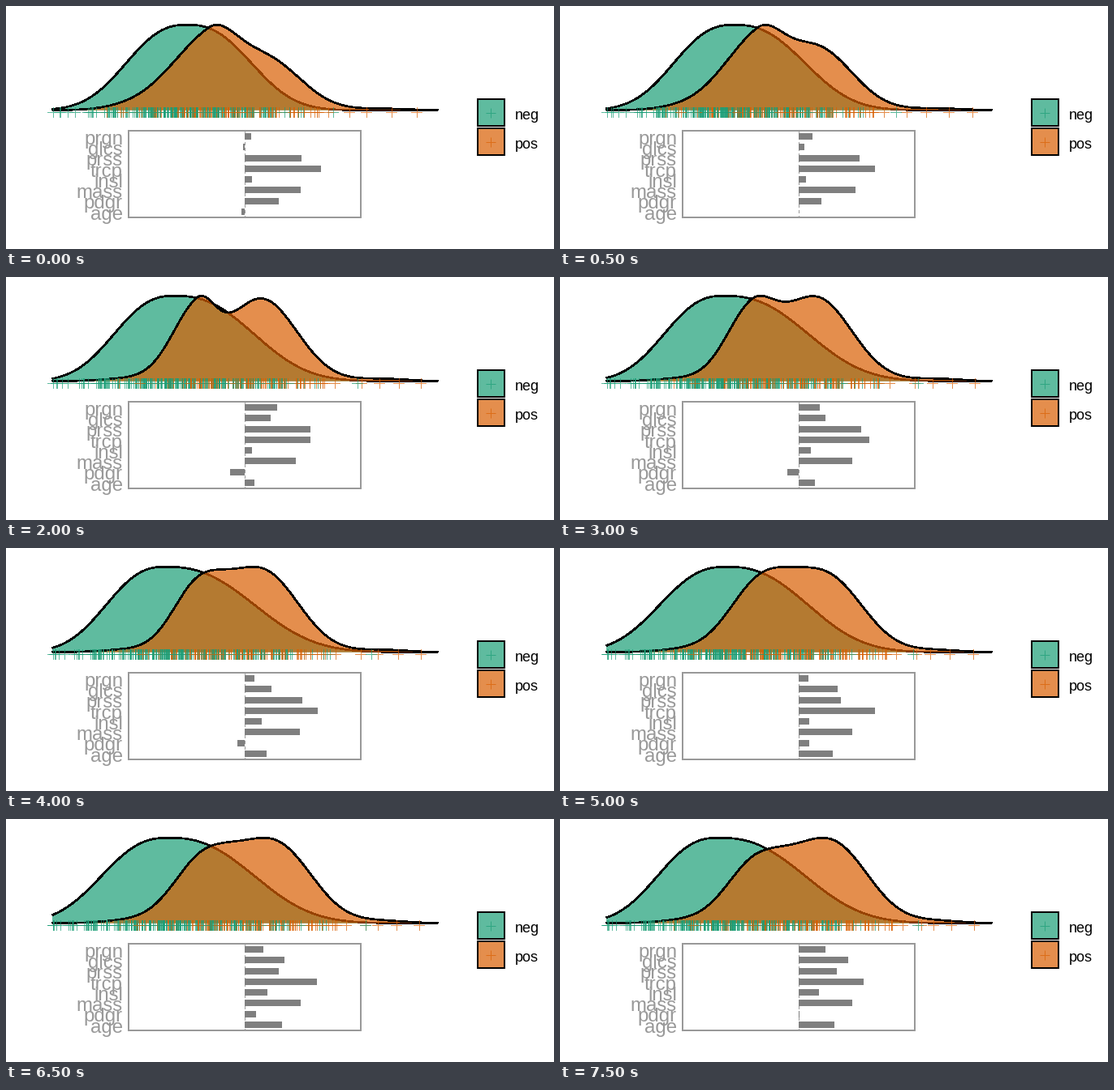
Write a matplotlib script that moves like this. It is 675 px wide and 300 px high and loops after 8000 ms.

```python
import matplotlib.pyplot as plt
import numpy as np
from matplotlib.animation import FuncAnimation
from matplotlib.patches import Polygon, Rectangle

W, H, DPI = 675, 300, 100
PT = 72 / DPI
N_FRAMES, INTERVAL = 16, 500

GREEN, ORANGE = "#1b9e77", "#d95f02"
ALPHA = 0.7
BASE, PEAK = 128.7, 105.5
RUG_Y = 131
ZERO_X, UNIT = 294, 143
NAMES = ["prgn", "glcs", "prss", "trcp", "insl", "mass", "pdgr", "age"]

# Key moments by frame number; everything between them is blended.
# Stops of the tour: one weight per variable, scaled to unit length
TOUR = {
    0: (8, -2, 70, 94, 9, 69, 42, -4),
    4: (40, 32, 81, 81, 9, 63, -18, 12),
    8: (12, 33, 71, 90, 21, 68, -9, 27),
    10: (12, 48, 52, 94, 13, 66, 13, 42),
    13: (23, 49, 42, 89, 28, 69, 14, 46),
    15: (33, 61, 47, 80, 25, 66, 1, 44),
}
# Peak, left width, right width
NEG = {
    0: (223, 70, 74),
    2: (205, 68, 90),
    4: (207, 69, 92),
    8: (196, 68, 103),
    10: (205, 77, 94),
    13: (200, 77, 99),
    15: (195, 70, 100),
}
# First bell: height, peak, left width, right width; second bell: peak
POS = {
    0: (1.29, 250, 50, 31, 318),
    2: (0.80, 236, 39, 27, 312),
    4: (0.81, 235, 32, 22, 314),
    8: (0.75, 236, 32, 34, 316),
    10: (0.92, 247, 39, 40, 330),
    15: (0.80, 244, 38, 43, 336),
}

xs = np.arange(57, 533)


def blend(keys, frame):
    """Linear mix of the two key moments around a frame."""
    return np.array([np.interp(frame, list(keys), column)
                     for column in zip(*keys.values())])


def bell(peak, left, right, power=2):
    z = np.abs(xs - peak) / np.where(xs < peak, left, right)
    return np.exp(-0.5 * z ** power)


def neg_density(frame):
    return bell(*blend(NEG, frame), power=2.5)


def pos_density(frame):
    height, peak, left, right, second = blend(POS, frame)
    tails = 0.03 * (bell(145, 30, 30) + bell(465, 30, 30))
    return height * bell(peak, left, right) + bell(second, 44, 44) + tails


def quantiles(d, u):
    cdf = np.cumsum(d)
    return np.interp(u, cdf / cdf[-1], xs)


fig = plt.figure(figsize=(W / DPI, H / DPI), dpi=DPI, facecolor="white")
ax = fig.add_axes([0, 0, 1, 1])
ax.axis("off")


def label(x, y, text, size, color, ha):
    ax.text(x, y, text, fontsize=size * PT, color=color, ha=ha,
            va="baseline", family="Liberation Sans")


def crosses(x, y, colors):
    return ax.scatter(x, y, s=(12.5 * PT) ** 2, c=colors, marker="+",
                      linewidths=PT, alpha=ALPHA, zorder=3, antialiased=False)


class Hill:
    def __init__(self, color, z):
        self.fill = ax.add_patch(Polygon([(0, 0), (1, 0), (1, 1)], fc=color,
                                         ec="none", alpha=ALPHA, zorder=z))
        self.line, = ax.plot([], [], color="black", lw=1.6 * PT,
                             zorder=z + 0.1, antialiased=False,
                             solid_capstyle="butt")

    def update(self, d):
        y = BASE - PEAK * d / d.max()
        self.fill.set_xy([(xs[0], BASE), *zip(xs, y), (xs[-1], BASE)])
        self.line.set_data(xs, y)


neg_hill, pos_hill = Hill(GREEN, 1), Hill(ORANGE, 2)

# Rug: every case keeps its rank within its class
N_NEG, N_POS = 262, 130
rng = np.random.default_rng(5)
u_neg, u_pos = rng.random(N_NEG), rng.random(N_POS)
order = rng.permutation(N_NEG + N_POS)
rug_y = np.full(len(order), RUG_Y)
rug_colors = np.array([GREEN] * N_NEG + [ORANGE] * N_POS)[order]
rug = crosses(0 * rug_y, rug_y, rug_colors)

# Weights panel
rows_y = 160.92 + 13.31 * np.arange(len(NAMES))
ax.plot([ZERO_X - 0.5] * 2, [154, 261], color="#999999", lw=PT,
        dashes=(4, 4), zorder=1, antialiased=False)
bars = ax.barh(rows_y, np.zeros(len(NAMES)), height=8, left=ZERO_X,
               color="#7f7f7f", zorder=2)
ax.add_patch(Rectangle((151, 154), 286, 107, fill=False, ec="#999999",
                       lw=2 * PT, zorder=3))
for y, name in zip(rows_y, NAMES):
    label(144, y + 9.7, name, 24, "#999999", "right")

# Legend
for name, color, top in [("neg", GREEN, 115), ("pos", ORANGE, 151)]:
    box = (581, top), 33, 33
    ax.add_patch(Rectangle(*box, fc=color, ec="none", alpha=ALPHA, zorder=1))
    ax.add_patch(Rectangle(*box, fill=False, ec="black", lw=2 * PT, zorder=2))
    crosses([597], [top + 16.5], [color])
    label(627, top + 24.5, name, 18, "black", "left")

ax.set(xlim=(0, W), ylim=(H, 0))


def update(frame):
    d_neg, d_pos = neg_density(frame), pos_density(frame)
    neg_hill.update(d_neg)
    pos_hill.update(d_pos)

    x = np.concatenate([quantiles(d_neg, u_neg), quantiles(d_pos, u_pos)])
    rug.set_offsets(np.column_stack([np.floor(x[order]) + 0.5, rug_y]))

    weights = blend(TOUR, frame)
    weights *= UNIT / np.linalg.norm(weights)
    for bar, width in zip(bars, weights):
        bar.set_width(width)
    return []


anim = FuncAnimation(fig, update, frames=N_FRAMES, interval=INTERVAL,
                     repeat=True, repeat_delay=0, blit=False)
plt.show()
```
